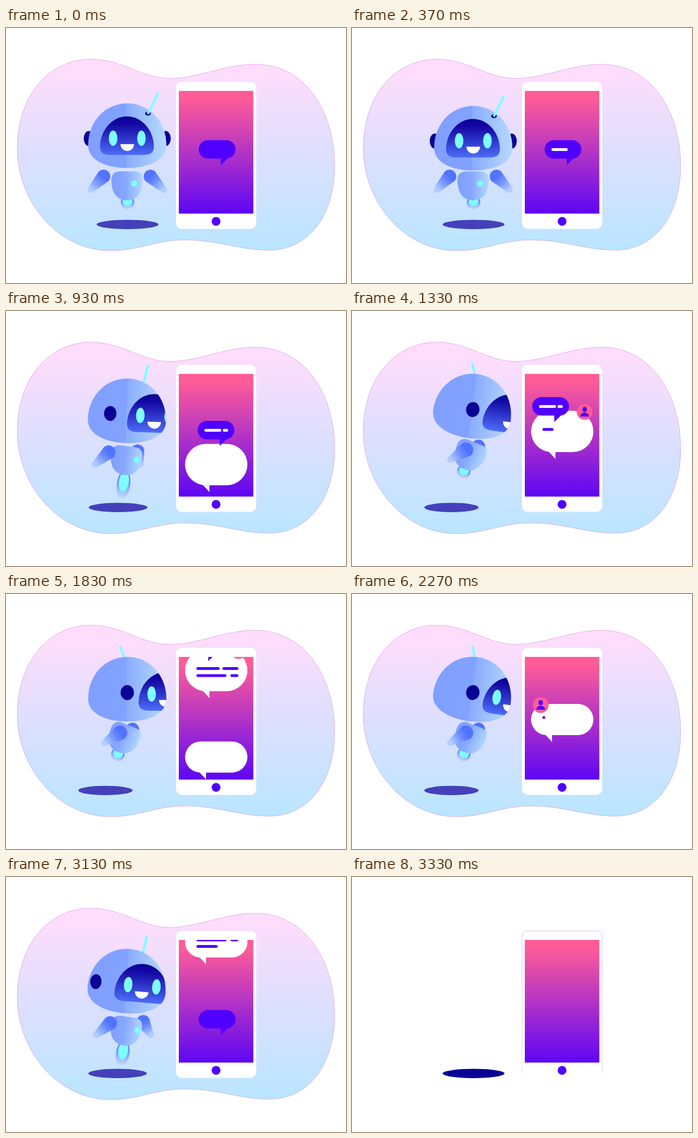
An HTML page with a canvas that plays this animation: 600x450 px, repeating every 3360 ms.

```html
<!DOCTYPE html>
<html lang="en">
<head>
<meta charset="utf-8">
<title>Chat robot</title>
<style>
html, body { margin: 0; width: 100%; height: 100%; overflow: hidden; background: #fff; }
canvas { display: block; width: 600px; height: 450px; }
</style>
</head>
<body>
<canvas id="stage" width="600" height="450"></canvas>
<script>
const ctx = document.getElementById('stage').getContext('2d');
const LOOP = 3360, FLASH = 3330;
const BLUE = '#5000ff', NAVY = '#0a0096', CYAN = '#7dffff', PINK = '#ff5c97';

const blob = new Path2D('M20 213C20 120 75 55 150 55C205 55 240 89 288 89C340 89 385 64 440 64' +
  'C530 64 580 150 580 243C580 330 535 392 465 392C410 392 375 374 315 374' +
  'C265 374 235 393 185 393C90 393 20 305 20 213Z');
const skull = new Path2D('M145 207C145 165 175 133 214 133C253 133 283 165 283 207' +
  'C283 234 250 247 214 247C178 247 145 234 145 207Z');
const visor = new Path2D('M183 224C172 224 166 219 166 210C166 182 186 156 213.5 156' +
  'C241 156 261 182 261 210C261 219 255 224 244 224Z');
const torso = new Path2D('M202 253H226C237 253 241 259 241 268C241 290 232 304 213.5 304' +
  'C195 304 186 290 186 268C186 259 191 253 202 253Z');

// time helpers
const clamp = u => Math.max(0, Math.min(1, u));
const span = (t, a, b) => clamp((t - a) / (b - a));
const out = (u, k) => 1 - Math.pow(1 - u, k);
const sineOut = u => Math.sin(u * Math.PI / 2);
const smooth = u => u * u * (3 - 2 * u);
const hump = u => Math.sin(u * Math.PI);

// drawing helpers
function grad(x0, y0, x1, y1, stops) {
  const g = ctx.createLinearGradient(x0, y0, x1, y1);
  stops.forEach(([at, color]) => g.addColorStop(at, color));
  return g;
}
function oval(x, y, rx, ry, fill) {
  ctx.fillStyle = fill;
  ctx.beginPath();
  ctx.ellipse(x, y, rx, Math.max(0, ry), 0, 0, Math.PI * 2);
  ctx.fill();
}
function poly(fill, ...pts) {
  ctx.fillStyle = fill;
  ctx.beginPath();
  pts.forEach(p => ctx.lineTo(p[0], p[1]));
  ctx.fill();
}
function box(x, y, w, h, r, fill) {
  ctx.fillStyle = fill;
  ctx.beginPath();
  ctx.roundRect(x, y, w, h, r);
  ctx.fill();
}
function line(x0, y0, x1, y1, width, color) {
  ctx.strokeStyle = color;
  ctx.lineWidth = width;
  ctx.lineCap = 'round';
  ctx.beginPath();
  ctx.moveTo(x0, y0);
  ctx.lineTo(x1, y1);
  ctx.stroke();
}
function turnAbout(x, y, deg) {
  ctx.translate(x, y);
  ctx.rotate(deg * Math.PI / 180);
  ctx.translate(-x, -y);
}
function scoped(draw) {
  ctx.save();
  draw();
  ctx.restore();
}

function poseAt(t) {
  const go = span(t, 700, 1200), back = span(t, 2830, FLASH);
  const home = t >= 2830;
  const turn = home ? 1 - back : out(go, 2);
  return {
    turn,
    lag: home ? turn : smooth(span(t, 770, 1200)),
    lift: home ? 1 - out(back, 1.36) : out(go, 1.6),
    slide: home ? 1 - Math.pow(back, 1.18) : Math.pow(go, 1.1),
    tilt: 8 * (smooth(span(t, 800, 1200)) - smooth(span(t, 1500, 1760)) +
      smooth(span(t, 1860, 2150)) - smooth(span(t, 2980, 3320))),
    nod: 6 * hump(span(t, 30, 500)),
    flame: 2.2 * hump(go) + 1.85 * hump(span(t, 2765, FLASH)),
    eye: 1 - clamp(1.3 * hump(span(t, 1240, 1420)))
  };
}

function limb(x0, y0, r0, x1, y1, r1) {
  const a = Math.atan2(y1 - y0, x1 - x0), q = Math.PI / 2;
  ctx.fillStyle = grad(x0, y0, x1, y1,
    [[0, '#5273ff'], [0.35, '#6c8dff'], [1, '#b2ceff']]);
  ctx.beginPath();
  ctx.arc(x0, y0, r0, a + q, a - q);
  ctx.arc(x1, y1, r1, a - q, a + q);
  ctx.fill();
}

function drawBody(p) {
  const { turn, lag, flame } = p;
  ctx.translate(0, -23 * p.lift);
  limb(255 - 32 * turn, 262, 12, 278 - 58 * turn, 285, 6);
  scoped(() => {
    ctx.translate(-6 * lag, 0);
    turnAbout(213.5, 278, 22 * lag);
    const outer = 320 + 12 * flame, inner = 314 + 9 * flame;
    oval(214.5, (296 + outer) / 2, 12, (outer - 296) / 2,
      grad(0, 298, 0, outer, [[0, '#4c6cf6'], [0.5, '#83a3fa'], [1, 'rgba(190,212,255,.7)']]));
    oval(214.5, (297 + inner) / 2, 8.7, (inner - 297) / 2, CYAN);
    ctx.fillStyle = grad(186, 0, 241, 0, [[0, '#809fff'], [0.45, '#87a7ff'], [1, '#b0d8ff']]);
    ctx.fill(torso);
    ctx.clip(torso);
    oval(226 + 20 * lag, 274.5, 5.5, 5.5, CYAN);
  });
  limb(172 + 29 * lag, 262 + 6 * lag, 12 + lag, 150 + 24 * lag, 285, 6);
}

function drawHead(p) {
  const { turn, lag } = p, front = turn < 0.1;
  ctx.translate(0, -22 * p.lift + p.nod);
  turnAbout(214, 190, p.tilt);

  const reach = 68 * Math.cos(turn * Math.PI / 2);
  const ear = x => oval(x, 195 + turn, 8.8 + 3 * turn, 13.2, NAVY);
  const antenna = () => line(251 - 38 * lag, 150 - 5 * lag,
    268 - 66 * lag, 116 - 7 * hump(lag), 4.4, CYAN);

  if (front) ear(214 - reach);
  if (turn < 0.6) ear(214 + reach);
  if (!front) antenna();
  ctx.fillStyle = grad(145, 0, 283, 0,
    [[0, '#809fff'], [0.48, '#82a2ff'], [0.5, '#8badfd'], [1, '#b6daff']]);
  ctx.fill(skull);
  if (front) {
    oval(250.5, 151, 5, 3.6, NAVY);
    antenna();
  }
  scoped(() => {
    ctx.clip(skull);
    ctx.translate(68 * turn, 4 * turn);
    ctx.fillStyle = grad(0, 156, 0, 224, [[0, NAVY], [0.2, '#1408a4'], [1, '#4d6cf8']]);
    ctx.fill(visor);
    oval(189, 194.5, 7.6, 13.5 * p.eye, CYAN);
    oval(239, 194.5, 7.6, 13.5 * p.eye, CYAN);
    ctx.fillStyle = '#fff';
    ctx.beginPath();
    ctx.ellipse(214, 205, 12, 12, 0, 0, Math.PI);
    ctx.fill();
  });
  if (!front) ear(214 - reach);
}

// bars: [x, y, length], revealed one after another
function typeBars(bars, u, color) {
  let left = u * bars.reduce((sum, b) => sum + b[2], 0);
  for (const [x, y, len] of bars) {
    if (left <= 0) return;
    line(x + 2.5, y, x + 2.5 + Math.max(0, Math.min(left, len) - 5), y, 5, color);
    left -= len;
  }
}

function blueBubble(x, y, typed) {
  box(x, y, 65, 32.5, 16.2, BLUE);
  poly(BLUE, [x + 39, y + 30], [x + 39, y + 44], [x + 53, y + 30]);
  typeBars([[x + 12, y + 16.5, 30], [x + 44.5, y + 16.5, 9.5]], typed, '#fff');
}
function whiteBubble(y, h, tail) {
  box(316, y, 110, h, h / 2, '#fff');
  poly('#fff', [tail, y + h - 1], [tail + 12, y + h + 12], [tail + 12, y + h - 1]);
}
function avatar(x, y, size) {
  if (size <= 0) return;
  scoped(() => {
    ctx.translate(x, y);
    ctx.scale(size, size);
    oval(0, 0, 14, 14, PINK);
    oval(0, -4.3, 4, 4.5, BLUE);
    ctx.beginPath();
    ctx.ellipse(0, 8.3, 7.7, 7, 0, Math.PI, 0);
    ctx.fill();
  });
}

function drawChat(t) {
  const first = sineOut(span(t, 700, 1250));
  const second = sineOut(span(t, 1630, 2230));
  const third = out(span(t, 2830, FLASH), 1.36);
  const rise2 = 133 * second, rise3 = 129 * third;
  const push = smooth(span(t, 860, 1250));

  if (t >= 700 && second < 1) {
    const y = 327 - 151 * first - 1.16 * rise2;
    whiteBubble(y, 73, 347);
    typeBars([[336, y + 33, 41], [382, y + 33, 28], [336, y + 45.5, 53], [396, y + 45.5, 14]],
      span(t, 1281, 1625), BLUE);
    avatar(410.5, y + 2, smooth(span(t, 1130, 1270)));
  }
  if (second < 1) {
    blueBubble(340 - 22 * push, 198 - 46 * push - 1.16 * rise2, span(t, 30, 500));
  }
  if (second > 0 && third < 1) {
    const y = 327 - rise2 - 1.16 * rise3;
    whiteBubble(y, 55, 341);
    typeBars([[336, y + 24, 53], [396, y + 24, 14], [336, y + 35.5, 37.5]],
      span(t, 2256, 2700), BLUE);
    avatar(333, y + 2, smooth(span(t, 2080, 2210)));
  }
  if (third > 0) blueBubble(340, 327 - rise3, 0);
}

function drawPhone(t, bare) {
  box(300, 95, 141.5, 259.5, 10, '#fff');
  if (bare) {
    ctx.strokeStyle = grad(0, 95, 0, 354, [[0, '#d9a6dc'], [0.95, '#e3c6ee'], [1, '#fff']]);
    ctx.lineWidth = 0.7;
    ctx.stroke();
  }
  scoped(() => {
    ctx.beginPath();
    ctx.rect(305, 111, 131.5, 216.5);
    ctx.clip();
    ctx.fillStyle = grad(0, 111, 0, 327, [[0, PINK], [0.06, PINK], [0.5, '#b434c4'], [1, '#5e06f4']]);
    ctx.fillRect(305, 111, 132, 217);
    if (!bare) drawChat(t);
  });
  oval(370.7, 341.3, 7.8, 7.8, BLUE);
}

function render(t) {
  const bare = t >= FLASH;
  ctx.fillStyle = '#fff';
  ctx.fillRect(0, 0, 600, 450);
  if (bare) {
    oval(214.5, 346.7, 54.5, 8.2, NAVY);
    drawPhone(t, true);
    return;
  }
  ctx.fillStyle = grad(0, 55, 0, 393, [[0, '#ffddfb'], [0.1, '#fcddfb'], [0.5, '#dddfff'], [1, '#b9e6ff']]);
  ctx.fill(blob);
  ctx.strokeStyle = 'rgba(205,110,215,.7)';
  ctx.lineWidth = 0.7;
  ctx.stroke(blob);

  const pose = poseAt(t);
  oval(214.5 - 39 * pose.slide, 346.7, 54.5 - 6.5 * pose.slide, 8.2, '#4440ba');
  drawPhone(t, false);
  scoped(() => drawBody(pose));
  scoped(() => drawHead(pose));
}

const start = performance.now();
function tick(now) {
  render(Math.max(0, now - start) % LOOP);
  requestAnimationFrame(tick);
}
render(0);
requestAnimationFrame(tick);
</script>
</body>
</html>
```
